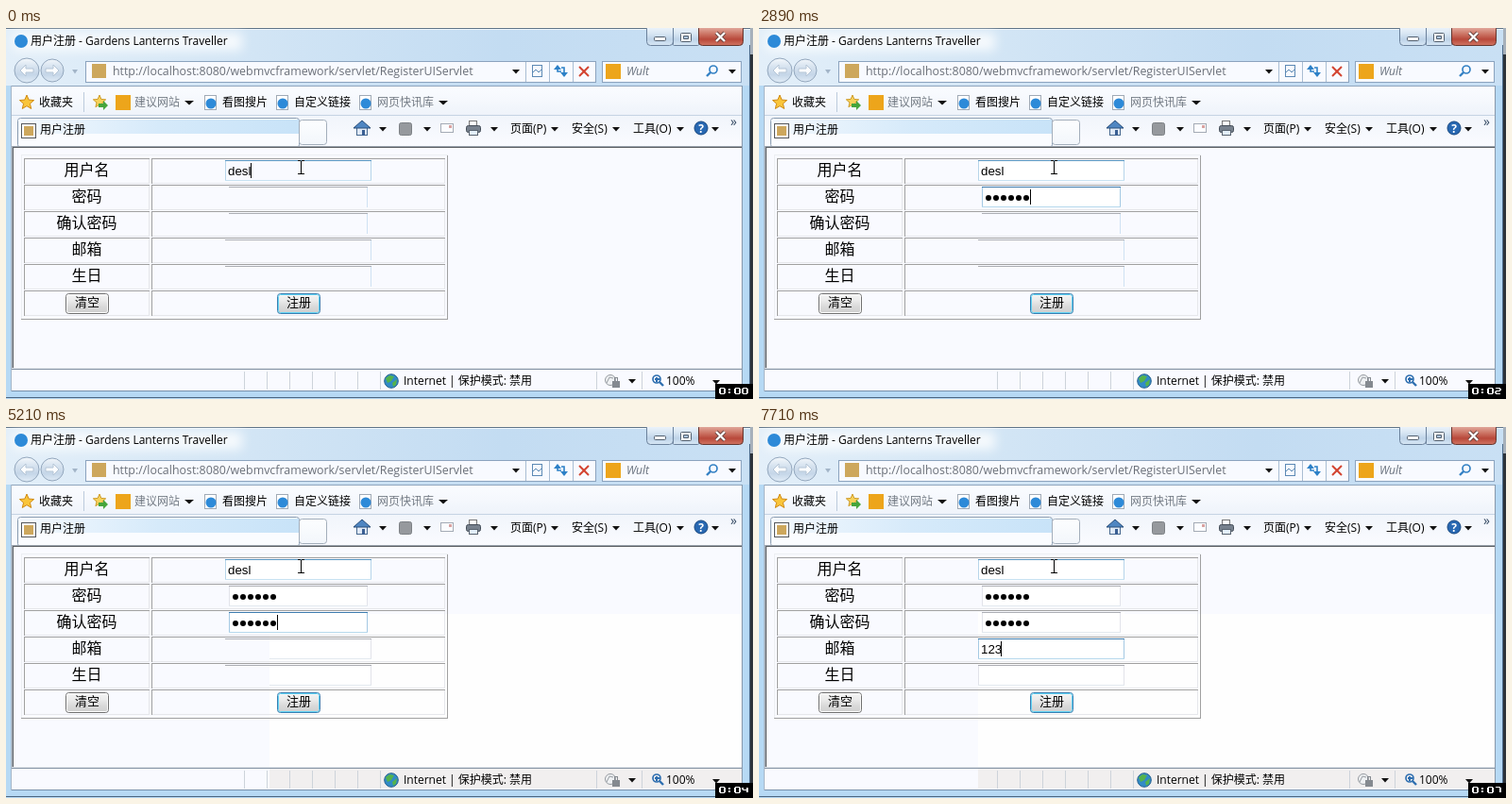
Write an HTML page with a canvas that moves like this. It is 791 px wide and 393 px high and loops after 7990 ms.

```html
<!DOCTYPE html>
<html lang="zh-CN">
<head>
<meta charset="utf-8">
<title>用户注册</title>
<style>
html, body { margin: 0; width: 100%; height: 100%; overflow: hidden; }
canvas { display: block; }
</style>
</head>
<body>
<canvas id="stage" width="791" height="393"></canvas>
<script>
const LOOP = 7990;
const UI = '"Open Sans", "Noto Sans CJK SC", "Noto Sans CJK", sans-serif';
const SONG = '"Noto Sans CJK SC", "Noto Sans CJK", sans-serif';
const ARIAL = '"Liberation Sans", Arial, sans-serif';
const stage = document.getElementById('stage').getContext('2d');
const backdrop = document.createElement('canvas');
backdrop.width = 791;
backdrop.height = 393;
let g = backdrop.getContext('2d');

// Drawing helpers
function rect(x, y, w, h, fill) {
  g.fillStyle = fill;
  g.fillRect(x, y, w, h);
}
function frame(x, y, w, h, color) {
  g.strokeStyle = color;
  g.lineWidth = 1;
  g.strokeRect(x + .5, y + .5, w - 1, h - 1);
}
function rounded(x, y, w, h, r, fill, line) {
  g.beginPath();
  g.roundRect(x + .5, y + .5, w - 1, h - 1, r);
  if (fill) { g.fillStyle = fill; g.fill(); }
  if (line) { g.strokeStyle = line; g.lineWidth = 1; g.stroke(); }
}
function disc(x, y, r, fill, line) {
  g.beginPath();
  g.arc(x, y, r, 0, Math.PI * 2);
  g.fillStyle = fill;
  g.fill();
  if (line) { g.strokeStyle = line; g.lineWidth = 1; g.stroke(); }
}
function poly(points, fill, line, width = 1) {
  g.beginPath();
  points.forEach(([x, y]) => g.lineTo(x, y));
  if (fill) { g.closePath(); g.fillStyle = fill; g.fill(); }
  if (line) { g.strokeStyle = line; g.lineWidth = width; g.stroke(); }
}
function gradient(x0, y0, x1, y1, ...colors) {
  const fade = g.createLinearGradient(x0, y0, x1, y1);
  colors.forEach((c, i) => fade.addColorStop(i / (colors.length - 1), c));
  return fade;
}
const down = (y, h, ...colors) => gradient(0, y, 0, y + h, ...colors);
function label(text, x, y, color = '#000', font = '12px ' + UI, align = 'left') {
  g.font = font;
  g.textAlign = align;
  g.fillStyle = color;
  g.fillText(text, x, y);
}
const arrow = (x, y, s = 4, color = '#111') => poly([[x - s, y - 2], [x + s, y - 2], [x, y + 2.5]], color);
function star(x, y, r, fill, line) {
  const points = Array.from({ length: 10 }, (_, i) => {
    const a = i * Math.PI / 5 - Math.PI / 2, d = i % 2 ? r * .45 : r;
    return [x + d * Math.cos(a), y + d * Math.sin(a)];
  });
  poly([...points, points[0]], fill, line);
}
// side: -1 puts the handle at the left, 1 at the right
function lens(x, y, color, side) {
  g.beginPath();
  g.arc(x - side, y - 1, 4, 0, Math.PI * 2);
  g.strokeStyle = color;
  g.lineWidth = 1.7;
  g.stroke();
  poly([[x + 2 * side, y + 2], [x + 6 * side, y + 6]], null, color, 2.4);
}

function drawWindow() {
  rect(0, 0, 791, 393, '#b6d9f4');
  rect(0, 0, 791, 61, gradient(0, 0, 791, 0, '#e3eff9', '#d2e5f5', '#c3dcf2', '#c9e0f4'));
  rect(0, 0, 791, 1, '#5f7488');
  rect(0, 1, 791, 1, '#eef6fc');
  g.save();
  g.filter = 'blur(6px)';
  rect(8, 5, 242, 19, 'rgba(255,255,255,.8)');
  g.restore();
  disc(16, 14, 7, '#2d8ad8');
  label('用户注册 - Gardens Lanterns Traveller', 26, 18);

  const red = down(0, 18, '#e0a69a', '#cd7767', '#b8483a', '#cf7260');
  const glass = down(0, 18, '#eaf2fa', '#d8e6f3', '#bed3e8', '#d6e6f4');
  rounded(678, -4, 29, 23, 4, glass, '#6b819b');
  rounded(706, -4, 28, 23, 1, glass, '#6b819b');
  rounded(733, -4, 48, 23, 4, red, '#65352d');
  rounded(686, 9, 13, 5, 1, '#fff', '#53606f');
  rounded(714, 5, 12, 10, 1, '#fff', '#53606f');
  rounded(717, 8, 6, 4, 0, '#a9c0d8', '#53606f');
  for (const [color, width] of [['#65413c', 4], ['#fff', 2.4]]) {
    poly([[752, 5], [761, 14]], null, color, width);
    poly([[761, 5], [752, 14]], null, color, width);
  }
}

function drawNavigation() {
  for (const [x, r, s] of [[22, 13, 1], [49, 12, -1]]) {
    disc(x, 45, r, down(32, 26, '#f4f8fc', '#d8e4f0', '#c5d6e8', '#e2edf7'), '#93a7bd');
    poly([[x - 7 * s, 45], [x - s, 39], [x - s, 43], [x + 7 * s, 43],
      [x + 7 * s, 47], [x - s, 47], [x - s, 51], [x - 7 * s, 45]], '#fbfdff', '#b5c5d6');
  }
  arrow(73, 46, 3, '#a3b5c8');
  rect(84, 35, 541, 23, '#f8faff');
  frame(84, 35, 541, 23, '#8ba3be');
  rect(91, 38, 15, 15, '#cda75c');
  label('http://localhost:8080/webmvcframework/servlet/RegisterUIServlet', 113, 50, '#6a6f78', '12.4px ' + UI);
  arrow(540, 46);
  for (const x of [550, 575, 600]) rect(x, 36, 1, 21, '#a9bdd3');
  frame(557, 39, 11, 13, '#5c89b5');
  poly([[558, 47], [561, 44], [564, 47], [567, 44]], null, '#5c89b5');
  poly([[580, 44], [588, 44], [584, 39]], '#2c80c7');
  poly([[584, 43], [584, 46], [588, 46]], null, '#2c80c7', 1.6);
  poly([[587, 47], [595, 47], [591, 52]], '#2c80c7');
  poly([[591, 48], [591, 42], [588, 42]], null, '#2c80c7', 1.6);
  poly([[607, 41], [617, 51]], null, '#d3422f', 2);
  poly([[617, 41], [607, 51]], null, '#d3422f', 2);
  rect(631, 35, 148, 23, '#f8faff');
  frame(631, 35, 148, 23, '#8ba3be');
  rect(635, 38, 16, 16, '#eda51b');
  label('Wult', 657, 50, '#68717d', 'italic 12px ' + UI);
  lens(748, 45, '#3481c4', -1);
  arrow(769, 46);
}

function drawToolbars() {
  rect(6, 62, 774, 31, down(62, 31, '#fafcff', '#f5f8fd', '#eef3fa'));
  rect(6, 61, 774, 1, '#8fa5bd');
  rect(6, 93, 774, 32, down(93, 32, '#f1f5fb', '#fafbff'));
  rect(6, 92, 774, 1, '#c5d3e3');
  star(22, 79, 8, '#f9c53a', '#d18a14');
  label('收藏夹', 35, 83);
  rect(82, 68, 1, 21, '#bccbdc');
  star(99, 78, 7, '#f7d25b', '#cf9b28');
  rect(98, 80, 6, 4, '#45a53c');
  poly([[103, 77], [108, 82], [103, 87]], '#45a53c');
  rect(116, 71, 16, 16, '#eda51b');
  const gray = '#737b84';
  label('建议网站', 136, 83, gray);
  arrow(194, 79, 5);
  label('看图搜片', 229, 83);
  label('自定义链接', 305, 83);
  label('网页快讯库', 393, 83, gray);
  for (const x of [209, 285, 373]) {
    rect(x + 1, 71, 13, 16, '#fff');
    frame(x + 1, 71, 13, 16, '#a0aab6');
    disc(x + 8, 80, 5.5, '#2d8ad8');
  }
  arrow(463, 79, 5);

  rounded(12, 95, 299, 32, 3, '#fafcff', '#889bb0');
  rect(13, 97, 297, 15, gradient(13, 0, 310, 0, '#f4f9fe', '#d6eafa', '#c8e3f8'));
  rounded(310, 97, 30, 27, 3, down(97, 27, '#fdfeff', '#f2f6fb'), '#a3aebb');
  rect(16, 101, 16, 16, '#fff');
  frame(16, 101, 16, 16, '#55585c');
  rect(19, 104, 10, 10, '#cda75c');
  label('用户注册', 36, 112);

  rect(371, 104, 12, 10, '#dfe9f6');
  frame(371, 104, 12, 10, '#48698f');
  poly([[368, 106], [377, 98], [386, 106]], '#4f86c2', '#294d79');
  rect(377, 108, 3, 6, '#3a5f93');
  rounded(416, 100, 14, 14, 2, '#96999d', '#7d8185');
  rect(460, 101, 14, 10, '#fbfcff');
  frame(460, 101, 14, 10, '#a4abb5');
  rect(469, 103, 3, 3, '#d9a2a0');
  rect(490, 98, 9, 6, '#fff');
  frame(490, 98, 9, 6, '#777');
  rounded(487, 103, 16, 8, 2, '#77818d', '#444d58');
  rect(490, 108, 10, 6, '#e3effb');
  frame(490, 108, 10, 6, '#59636f');
  label('页面(P)', 534, 111);
  label('安全(S)', 599, 111);
  label('工具(O)', 664, 111);
  disc(736, 106, 7, '#2868b2', '#174780');
  label('?', 736, 111, '#fff', 'bold 12px ' + UI, 'center');
  for (const x of [399, 446, 517, 581, 646, 714, 751]) arrow(x, 107);
  label('»', 767, 104, '#31465f', '14px ' + UI);
}

function drawFrame() {
  rect(6, 125, 774, 237, '#f9faff');
  rect(6, 125, 774, 1, '#9aa3ad');
  rect(7, 126, 772, 1, '#5d6064');
  rect(7, 126, 1, 235, '#5d6064');
  rect(6, 125, 1, 237, '#a5adb6');
  rect(6, 360, 774, 1, '#dfe4ea');
  rect(6, 361, 774, 1, '#8896a7');
  rect(6, 362, 774, 22, '#f9faff');
  rect(5, 384, 776, 1, '#7890aa');
  rect(779, 61, 1, 324, '#8798ab');
  rect(5, 61, 1, 324, '#a6b7c9');
  rect(787, 18, 1, 375, '#516f8e');
  rect(788, 0, 3, 393, '#2d3339');
  rect(788, 0, 3, 28, '#a6b0ba');
  rect(0, 391, 788, 1, '#4b6580');
}

function drawStatus() {
  for (const x of [252, 276, 300, 324, 348, 372, 396, 625, 673]) rect(x, 364, 1, 19, '#cdd3da');
  disc(408, 374, 7.3, '#318bc7', '#27628f');
  poly([[402, 371], [406, 368], [411, 369], [408, 374], [404, 376]], '#54b34c');
  poly([[409, 376], [414, 372], [413, 378], [410, 380]], '#54b34c');
  label('Internet | 保护模式: 禁用', 421, 378);
  disc(640, 373, 5.5, '#eff1f3', '#969ba1');
  poly([[636, 376], [639, 370], [643, 371]], null, '#969ba1');
  rect(642, 374, 8, 7, '#858a90');
  frame(644, 370, 4, 5, '#858a90');
  arrow(663, 374);
  lens(690, 373, '#2f6fb0', 1);
  rect(687, 371, 5, 2, '#2f6fb0');
  rect(688, 370, 2, 5, '#2f6fb0');
  label('100%', 699, 378);
  arrow(752, 375);
}

function drawButton(x, text, primary) {
  rounded(x, 281, 46, 22, 3, down(282, 20, '#f4f4f4', '#ebebeb', '#d9d9d9', '#cfcfcf'), primary ? '#3c7fb1' : '#707070');
  rounded(x + 1, 282, 44, 20, 2, null, primary ? '#62d3f4' : '#fbfbfb');
  label(text, x + 23, 295, '#000', '13px ' + SONG, 'center');
}

function drawTable() {
  rect(16, 134, 452, 1, '#eceef2');
  rect(16, 134, 1, 175, '#eceef2');
  rect(467, 135, 1, 174, '#a0a0a0');
  rect(16, 308, 452, 1, '#a0a0a0');
  ['用户名', '密码', '确认密码', '邮箱', '生日', ''].forEach((text, row) => {
    const y = 138 + row * 28;
    for (const [x, w] of [[19, 133], [154, 311]]) {
      rect(x, y + 26, w, 1, '#e6e7eb');
      rect(x + w - 1, y, 1, 27, '#e6e7eb');
      rect(x, y, w, 1, '#a0a0a0');
      rect(x, y, 1, 27, '#a0a0a0');
    }
    label(text, 85.5, y + 18, '#000', '300 16px ' + SONG, 'center');
  });
  drawButton(63, '清空', false);
  drawButton(287, '注册', true);
}

// Timeline
const keys = {
  password: [1380, 1660, 1940, 2320, 2610, 2890],
  confirm: [3830, 4110, 4520, 4800, 5080, 5210],
  mail: [7040, 7330, 7710]
};
const ticks = [1000, 2070, 3170, 4270, 5360, 6330, 7430];
const blinks = [[850, 1380], [5770, 5920], [6480, 7040]];
const focusAt = { name: 0, password: 280, confirm: 3270, mail: 5920 };
const passed = (times, t) => times.filter(at => t >= at).length;

// Field colours: top, sides, bottom
const LOOKS = {
  focus: ['#3d7bad', '#a4c9e3', '#b7d9ed'],
  hover: ['#5794bf', '#b7d5ea', '#c7e2f1'],
  idle: ['#abadb3', '#e2e3ea', '#e3e9ef']
};
function drawField(x, y, w, look, fill = '#fff') {
  if (look === 'stale') {
    rect(x, y, w, 1, '#abadb3');
    rect(x + w - 1, y + 1, 1, 21, '#cfe2f3');
    return;
  }
  const [top, side, bottom] = LOOKS[look];
  rect(x, y, w, 22, fill);
  frame(x, y, w, 22, side);
  rect(x, y + 21, w, 1, bottom);
  rect(x, y, w, 1, top);
}

function drawRefreshed(left) {
  rect(left, 198, 779 - left, 162, '#fefefe');
  if (left < 279) rect(left, 196, 155, 2, '#fefefe');
  rect(left, 362, 779 - left, 21, '#f1efef');
}

function drawForm(t, left) {
  const active = Object.keys(focusAt).filter(k => t >= focusAt[k]).pop();
  const look = k => t < focusAt[k] ? 'stale' : k === active ? 'focus' : 'idle';
  const count = k => passed(keys[k], t);

  drawField(232, 140, 155, 'hover', active === 'name' ? '#f9faff' : '#fff');
  drawField(236, 168, 147, look('password'));
  drawField(236, 196, 147, look('confirm'));
  drawField(232, 224, 155, look('mail'));
  drawField(232, 252, 155, 'stale');
  if (left) {
    g.save();
    g.beginPath();
    g.rect(left, 198, 500, 162);
    g.clip();
    if (active !== 'mail') drawField(232, 224, 155, 'idle');
    drawField(232, 252, 155, 'idle');
    g.restore();
  }

  const typed = '13.33px ' + ARIAL;
  label('desl', 235, 156, '#000', typed);
  label('123'.slice(0, count('mail')), 235, 240, '#000', typed);
  for (const [k, y] of [['password', 180], ['confirm', 208]])
    for (let i = 0; i < count(k); i++) disc(243 + i * 8, y, 3, '#000');

  const caret = {
    name: [259, 143],
    password: [239 + 8 * count('password'), 171],
    confirm: [239 + 8 * count('confirm'), 199],
    mail: [235 + 7 * count('mail'), 227]
  }[active];
  if (!blinks.some(([from, to]) => t >= from && t < to)) rect(...caret, 1, 16, '#000');
}

function drawPointer() {
  rect(312, 141, 1, 14, '#000');
  for (const y of [140, 154]) {
    rect(309, y, 3, 1, '#000');
    rect(313, y, 3, 1, '#000');
  }
}

// Clock digits are built from named bars
const BARS = {
  a: [1, 0, 5, 1], b: [5, 1, 2, 2], c: [5, 4, 2, 2], d: [1, 6, 5, 1],
  e: [0, 4, 2, 2], f: [0, 1, 2, 2], g: [1, 3, 5, 1],
  l: [0, 3, 2, 1], r: [5, 3, 2, 1], s: [3, 0, 2, 6], k: [2, 1, 1, 1],
  x: [2, 1, 2, 2], y: [2, 4, 2, 2]
};
const DIGITS = ['abcdeflr', 'skd', 'abged', 'abgcd', 'fgbcr', 'afgcd', 'afgecdl', 'abcr'];
function drawClock(seconds) {
  rect(751, 377, 40, 16, '#000');
  const glyph = (bars, x) => [...bars].forEach(key => {
    const [dx, dy, w, h] = BARS[key];
    rect(x + dx, 381 + dy, w, h, '#fff');
  });
  glyph(DIGITS[0], 755);
  glyph('xy', 763);
  glyph(DIGITS[0], 771);
  glyph(DIGITS[seconds], 779);
}

drawWindow();
drawNavigation();
drawToolbars();
drawFrame();
g = stage;

function render(t) {
  const left = t >= 5920 ? 232 : t >= 5210 ? 279 : 0;
  g.drawImage(backdrop, 0, 0);
  if (left) drawRefreshed(left);
  drawStatus();
  drawTable();
  drawForm(t, left);
  drawPointer();
  drawClock(passed(ticks, t));
}

const start = performance.now();
function loop() {
  render((performance.now() - start) % LOOP);
  requestAnimationFrame(loop);
}
loop();
</script>
</body>
</html>
```
